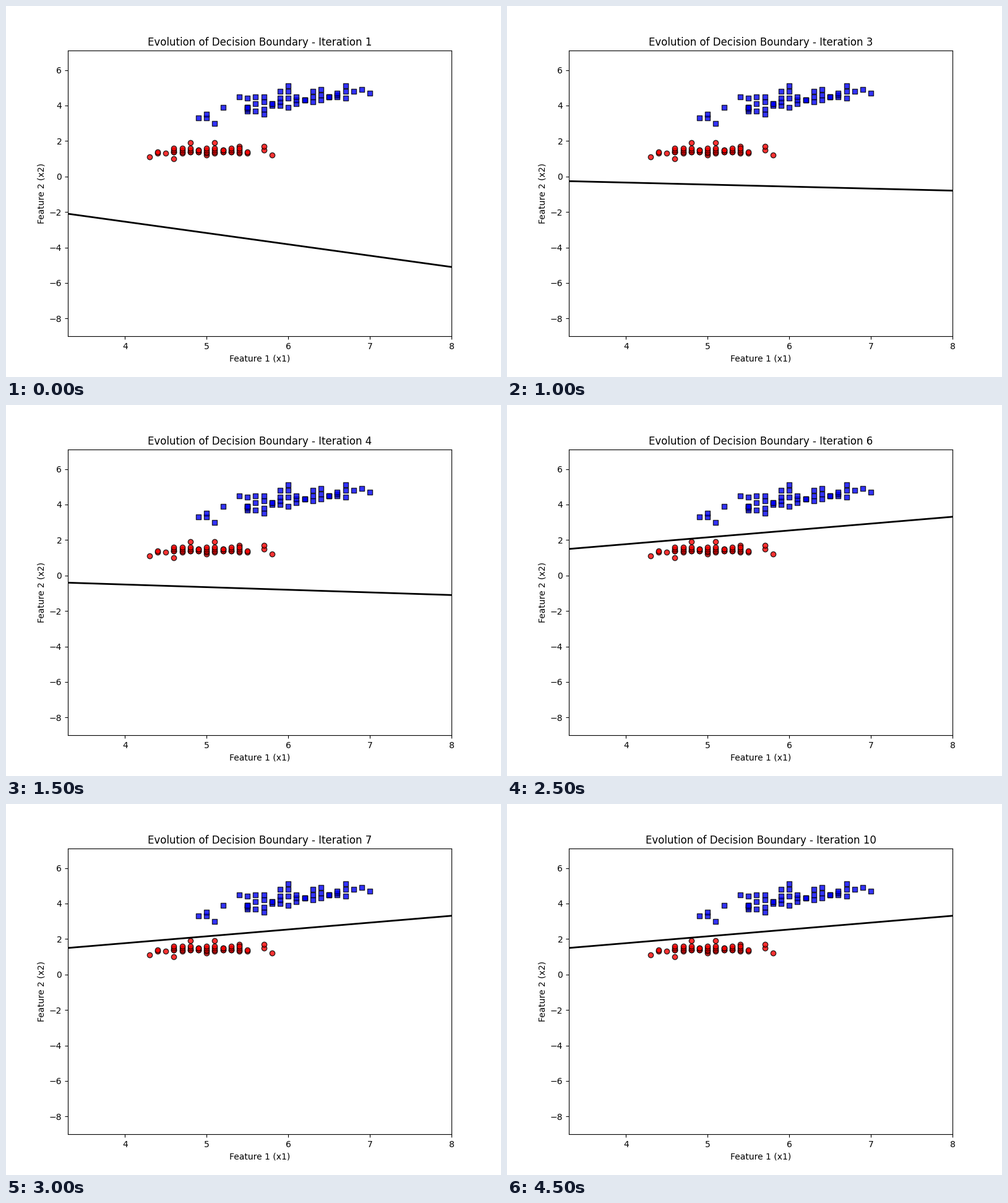
Recreate the animation shown at these times as a matplotlib script. Size 800 by 600 pixels, loop 5000 ms.

```python
import numpy as np
import matplotlib.pyplot as plt
from matplotlib.animation import FuncAnimation

PASSES = 10
X_RANGE = (3.3, 8.0)
# boundary height at both ends of X_RANGE per pass, until it has converged
BOUNDARIES = [(-2.100, -5.099), (-2.008, -4.853), (-0.262, -0.796),
              (-0.405, -1.101), (1.496, 3.309)]

# samples lying outside the regular bands
LOWER_EDGE = [(4.3, 1.1), (4.4, 1.3), (4.4, 1.4), (4.5, 1.3), (4.6, 1.0),
              (4.8, 1.9), (5.0, 1.2), (5.1, 1.9), (5.4, 1.7), (5.5, 1.3),
              (5.5, 1.4), (5.7, 1.5), (5.7, 1.7), (5.8, 1.2)]
UPPER_EDGE = [(4.9, 3.3), (5.0, 3.3), (5.0, 3.5), (5.1, 3.0), (5.2, 3.9),
              (5.4, 4.5), (5.5, 3.7), (5.5, 3.8), (5.5, 4.4), (5.7, 3.5),
              (5.9, 4.8), (6.0, 5.1), (6.8, 4.8), (6.9, 4.9), (7.0, 4.7)]


def band(first, last, peak, levels, middle, spread):
    """Columns of samples on a 0.1 grid whose height swells and shrinks."""
    points = []
    for x in np.arange(first, last + 0.05, 0.1):
        swell = np.cos(np.pi * (x - peak) / 0.35) ** 2
        ys = middle(x, swell) + spread(x, swell) * np.linspace(-1, 1, levels)
        points += [(x, y) for y in np.round(ys, 1)]
    return points


lower = LOWER_EDGE + band(4.6, 5.4, 5.05, 4,
                          lambda x, s: 1.46,
                          lambda x, s: 0.04 + 0.15 * s)
upper = UPPER_EDGE + band(5.5, 6.7, 5.65, 3,
                          lambda x, s: 3.93 + 0.59 * (x - 5.6) + 0.2 * s,
                          lambda x, s: (0.5 - 0.15 * (x - 5.6)) * s)

fig, ax = plt.subplots(figsize=(8, 6), dpi=100)
for points, color, marker in ((lower, "red", "o"), (upper, "blue", "s")):
    ax.scatter(*zip(*points), c=color, marker=marker, alpha=0.8,
               edgecolors="black")

line, = ax.plot([], [], color="black", lw=2)
ax.set_xlim(*X_RANGE)
ax.set_ylim(-9, 7.1)
ax.set_xlabel("Feature 1 (x1)")
ax.set_ylabel("Feature 2 (x2)")
title = ax.set_title("")


def update(i):
    line.set_data(X_RANGE, BOUNDARIES[min(i, len(BOUNDARIES) - 1)])
    title.set_text(f"Evolution of Decision Boundary - Iteration {i + 1}")
    return line, title


anim = FuncAnimation(fig, update, frames=PASSES, interval=500,
                     repeat=True, repeat_delay=0, blit=False)
plt.show()
```
